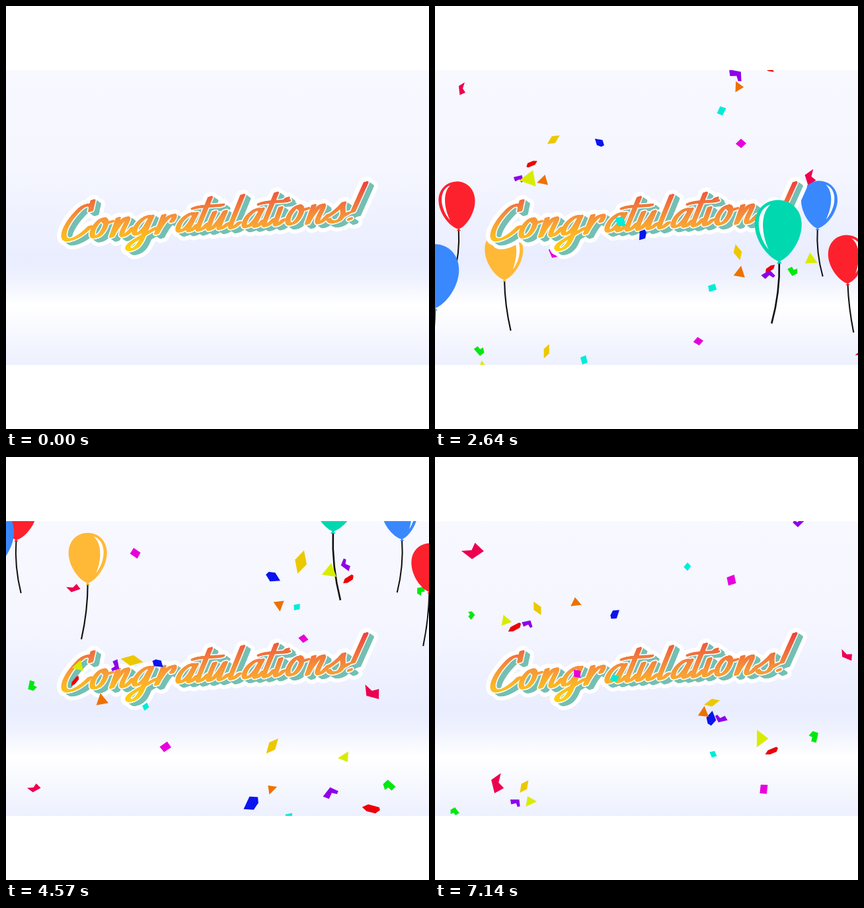
Recreate the animation shown at these times as an HTML page with a canvas. Size 640 by 640 pixels, loop 7210 ms.

```html
<!DOCTYPE html>
<html lang="en">
<head>
<meta charset="utf-8">
<title>Congratulations!</title>
<style>
html, body { margin: 0; width: 100%; height: 100%; overflow: hidden; background: #fff; }
canvas { display: block; width: 640px; height: 640px; }
</style>
</head>
<body>
<canvas id="stage" width="640" height="640" role="img" aria-label="Congratulations!"></canvas>
<script>
const LOOP = 7210, HOLD = 140, STEP = 71.41;
const TOP = 97, HEIGHT = 446;
const ctx = document.getElementById('stage').getContext('2d');

let seed = 29;
const random = () => (seed = seed * 16807 % 2147483647) / 2147483647;
const between = (a, b) => a + (b - a) * random();

function fillStops(gradient, stops) {
  stops.forEach(([at, color]) => gradient.addColorStop(at, color));
  return gradient;
}

// ---- Lettering: upright skeletons with an advance, slanted and inked with a broad nib

const LETTERS = {
  C: [36, 'M19 -57L21 -42C22 -54 8 -54 1 -42C-8 -28 -11 -12 -5 -3C2 6 18 0 29 -17'],
  o: [32, 'M10 -28C2 -28 -2 -14 0 -7C2 2 12 1 15 -8C18 -17 16 -27 9 -28C12 -22 18 -20 24 -23'],
  n: [31, 'M0 -27L0 0C2 -14 8 -27 13 -27C17 -27 15 -18 14 -10C13 -1 16 1 19 0C23 -2 26 -7 28 -11'],
  g: [37, 'M19 -25C12 -31 1 -20 1 -9C1 2 10 2 16 -11L20 -27L17 10C15 23 4 26 0 19C-1 11 14 5 32 -8'],
  r: [30, 'M1 -27L0 0C2 -14 8 -28 17 -26C19 -24 18 -20 17 -17'],
  a: [31, 'M18 -25C11 -31 0 -20 0 -9C0 2 10 2 16 -12L20 -27L17 -8C16 2 22 2 28 -9'],
  t: [17, 'M2 -50L0 -10C-1 3 6 2 13 -10M-18 -35C-8 -39 6 -36 25 -37'],
  u: [32, 'M0 -27C-1 -17 -2 -6 0 -2C3 3 11 -6 16 -27L15 -8C14 2 20 1 27 -8'],
  l: [20, 'M2 -50L0 -8C0 2 6 1 12 -8'],
  i: [18, 'M0 -27L0 -8C0 2 5 1 11 -8M3 -39l2 -2'],
  s: [33, 'M-6 -7C2 -12 10 -20 14 -28C13 -18 22 -13 18 -4C14 2 4 2 0 -4M18 -6L27 -12'],
  '!': [0, 'M4 -57L0 -14M-1 -2l1 -1']
};

function makeLettering() {
  const sheet = document.createElement('canvas');
  sheet.width = sheet.height = 640;
  const pen = sheet.getContext('2d');
  const word = new Path2D();
  let x = 92;
  for (const letter of 'Congratulations!') {
    const [advance, path] = LETTERS[letter];
    word.addPath(new Path2D(path), new DOMMatrix([1, -.066, -.36, 1, x, 359 - .066 * x]));
    x += advance;
  }
  pen.lineCap = pen.lineJoin = 'round';

  function ink(color, grow, dx = 0, dy = 0) {
    pen.strokeStyle = color;
    pen.lineWidth = 3.4 + 2 * grow;
    for (let k = -2.4; k < 2.5; k += 1.2) {
      pen.setTransform(1, 0, 0, 1, dx + k, dy - k * .3);
      pen.stroke(word);
    }
  }
  ink('#fff', 6.5);
  ink('#fff', 6.5, 8, 5.5);
  for (let k = 3; k <= 8; k++) ink('#74bfb4', .3, k, k * .7);
  ink('#fff', 1.6);
  ink(fillStops(pen.createLinearGradient(0, 265, 0, 370), [
    [0, '#f0403c'], [.33, '#f0743c'], [.57, '#f79a38'], [.76, '#fcb424'], [1, '#fed20a']
  ]), 0);
  return sheet;
}

// ---- Balloons: rise at a speed set by size, swinging like a pendulum.
// x, y and phase are taken at SIGHT.

const SIGHT = 1790, SWING = 2 * Math.PI / 3700;
const RED = '#fd212d', BLUE = '#3a88fe', YELLOW = '#ffb937', TEAL = '#00d8b0';
const backBalloons = [
  { color: RED, side: 1, w: 55, x: 25.5, y: 431, phase: .65 },
  { color: BLUE, side: 1, w: 74, x: -13, y: 583, phase: .17 },
  { color: YELLOW, side: -1, w: 58, x: 114, y: 513, phase: 0 },
  { color: BLUE, side: -1, w: 55, x: 589, y: 430, phase: .65 },
  { color: RED, side: -1, w: 56, x: 632, y: 515, phase: -.17 }
];
const frontBalloon = { color: TEAL, side: 1, w: 71, x: 508, y: 507, phase: .35 };

const body = new Path2D('M0 0C-.2 -.04 -.5 -.32 -.5 -.6C-.5 -.84 -.28 -1 0 -1' +
  'C.28 -1 .5 -.84 .5 -.6C.5 -.32 .2 -.04 0 0Z');
const shine = new Path2D('M-.15 -.93C-.5 -.85 -.48 -.45 -.22 -.2C-.38 -.5 -.36 -.8 -.15 -.93Z');
const knot = new Path2D('M0 -.02L.055 .035L-.055 .035Z');

function drawBalloon({ color, side, w, x, y, phase }, t) {
  const h = w * 1.31, swing = side * w / 6;
  const rise = w * .002 * (t - SIGHT), angle = phase + SWING * (t - SIGHT);
  const push = swing * Math.sin(angle), lean = swing * .5 * Math.cos(angle);
  const knotX = x + push - lean, knotY = y - rise;
  const endY = y + w * 1.26 - rise * .963;

  ctx.strokeStyle = '#111';
  ctx.lineWidth = w / 27;
  ctx.beginPath();
  ctx.moveTo(knotX, knotY);
  ctx.quadraticCurveTo(knotX - lean, (knotY + endY) / 2, knotX - push, endY);
  ctx.stroke();

  ctx.save();
  ctx.translate(knotX, knotY);
  ctx.rotate(Math.atan(lean / (h / 2)));
  ctx.scale(w * side, h);
  ctx.fillStyle = color;
  ctx.fill(body);
  ctx.fill(knot);
  ctx.fillStyle = '#fff';
  ctx.fill(shine);
  ctx.restore();
}

// ---- Confetti: every colour drops pieces in turn, at its own reach left and right of the middle

const KINDS = [
  { color: '#0a14ee', reach: 50, outline: '-9 1 -4 -8 8 -8 2 8 -8 8' },
  { color: '#00ecd8', reach: 85, outline: '-7 -4 2 -9 8 3 -1 9' },
  { color: '#e800dc', reach: 115, outline: '-5 -9 8 -7 5 9 -8 8' },
  { color: '#ecc800', reach: 135, outline: '-13 -7 4 -7 13 6 -4 6' },
  { color: '#ec7200', reach: 155, outline: '0 -11 10 8 -10 8' },
  { color: '#ec0008', reach: 180, outline: '-11 2 -5 -4 9 -5 11 -2 7 4 -4 5' },
  { color: '#9000e8', reach: 180, outline: '-4 -13 8 1 0 13 -4 10 -1 2 -9 -4' },
  { color: '#d8ec00', reach: 205, outline: '0 -11 11 8 -10 9' },
  { color: '#ec0050', reach: 260, outline: '-12 -8 -1 -2 7 -8 11 7 -6 8' },
  { color: '#00e810', reach: 290, outline: '-6 -7 2 -8 3 -1 9 -1 6 8 -3 9' }
];
const EVERY = 780;

function makeConfetti() {
  const bits = [];
  for (const { color, reach, outline } of KINDS) {
    const shape = new Path2D('M' + outline + 'Z');
    let side = random() < .5 ? -1 : 1;
    for (let born = between(150, 500); born < LOOP; born += EVERY * between(.8, 1.2)) {
      const size = .8 + .5 * random() ** 3;
      bits.push({
        color, shape, born, size,
        x: 320 + side * reach + between(-40, 40),
        fall: .13 + size * .08,
        drift: between(-.02, .02),
        phase: between(0, 6.28),
        spin: between(-.003, .003),
        behind: random() < .2
      });
      side = -side;
    }
  }
  return bits;
}

function drawBit(bit, t) {
  const age = t - bit.born;
  const y = TOP - 15 + bit.fall * age;
  if (age < 0 || y > TOP + HEIGHT + 20) return;
  ctx.save();
  ctx.translate(bit.x + bit.drift * age + 14 * Math.sin(bit.phase + age * .002), y);
  ctx.rotate(bit.phase + bit.spin * age);
  ctx.scale(bit.size, bit.size * (.85 + .15 * Math.cos(bit.phase + age * .004)));
  ctx.fillStyle = bit.color;
  ctx.fill(bit.shape);
  ctx.restore();
}

// ---- Scene

const lettering = makeLettering();
const confetti = makeConfetti();
const backBits = confetti.filter(bit => bit.behind);
const frontBits = confetti.filter(bit => !bit.behind);
const sky = fillStops(ctx.createLinearGradient(0, TOP, 0, TOP + HEIGHT), [
  [0, '#f8f8ff'], [.34, '#f5f6ff'], [.646, '#e9edfe'], [.7, '#eef1fe'], [.8, '#fff'], [1, '#edf0fe']
]);

function draw(t) {
  ctx.clearRect(0, 0, 640, 640);
  ctx.save();
  ctx.beginPath();
  ctx.rect(0, TOP, 640, HEIGHT);
  ctx.clip();
  ctx.fillStyle = sky;
  ctx.fillRect(0, TOP, 640, HEIGHT);
  backBits.forEach(bit => drawBit(bit, t));
  backBalloons.forEach(balloon => drawBalloon(balloon, t));
  ctx.drawImage(lettering, 0, 0);
  drawBalloon(frontBalloon, t);
  frontBits.forEach(bit => drawBit(bit, t));
  ctx.restore();
}

const start = performance.now();
function tick() {
  const t = (performance.now() - start) % LOOP;
  draw(t < HOLD ? 0 : HOLD + Math.floor((t - HOLD) / STEP + .1) * STEP);
  requestAnimationFrame(tick);
}
tick();
</script>
</body>
</html>
```
